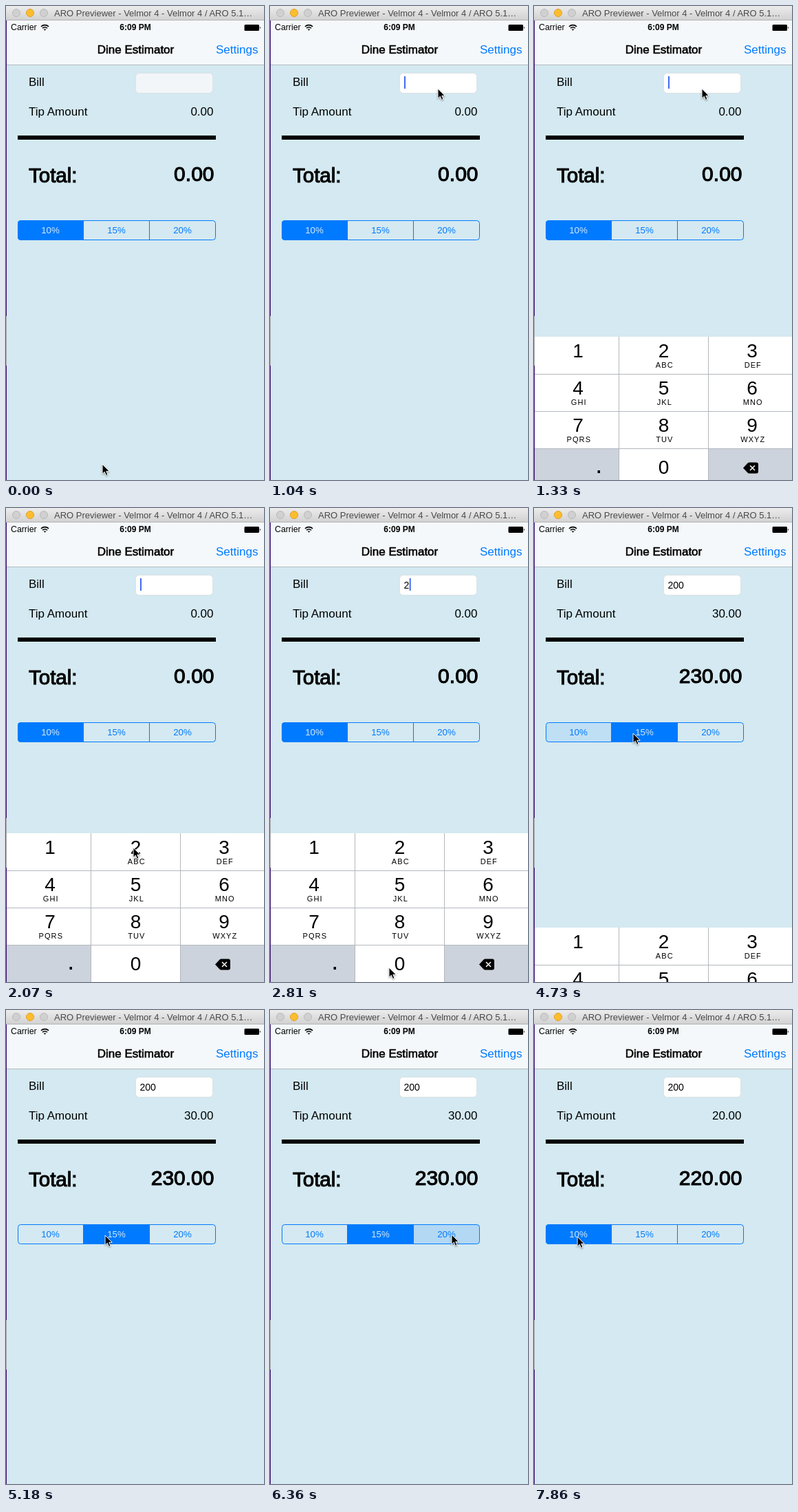
Animation of 375x688 px, one loop 8000 ms. Source, as an HTML page:

```html
<!DOCTYPE html>
<html lang="en">
<head>
<meta charset="utf-8">
<title>Dine Estimator</title>
<style>
html, body { margin: 0; width: 100%; height: 100%; overflow: hidden; background: #d4e9f1 }
svg { display: block; font: 17px "Liberation Sans", Arial, sans-serif }
.mid { text-anchor: middle }
.end { text-anchor: end }
.medium { stroke: #000; stroke-width: .6 }
.total { font-size: 30px; stroke: #000; stroke-width: 1.1 }
.blue { fill: #007aff }
.seg { font-size: 13.3px }
.digit { font-size: 28px }
.abc { font-size: 11px; letter-spacing: 1.1px }
#cursor { filter: drop-shadow(0 1px 1px #0006) }
</style>
</head>
<body>
<svg id="stage" width="375" height="688" viewBox="0 0 375 688">
  <defs>
    <linearGradient id="bar" x2="0" y2="1">
      <stop stop-color="#ececec"/><stop offset="1" stop-color="#d2d2d2"/>
    </linearGradient>
    <clipPath id="round"><rect x="17" y="311" width="288" height="29" rx="4.5"/></clipPath>
  </defs>
  <rect width="375" height="688" fill="#d4e9f1"/>

  <!-- navigation and status bars -->
  <path d="M0 21h375v64H0z" fill="#f4f8fa"/>
  <path d="M0 85.5h375" stroke="#b2bcc2"/>
  <text x="7" y="35" font-size="12.3">Carrier</text>
  <g fill="none" stroke="#000" stroke-width="1.6">
    <path d="M51 29.8a8 8 0 0 1 11 0M53 32.3a5 5 0 0 1 7 0"/>
    <path d="M54.6 33.6h3.8l-1.9 2.2z" fill="#000" stroke="none"/>
  </g>
  <text class="mid" x="188" y="35" font-size="12" font-weight="bold">6:09 PM</text>
  <rect x="346.5" y="27" width="21.5" height="9" rx="1.5"/>
  <path d="M369 30q2 1.5 0 3z"/>
  <text class="mid medium" x="188.5" y="69">Dine Estimator</text>
  <text class="blue" x="305" y="69">Settings</text>

  <!-- form -->
  <text x="33" y="116">Bill</text>
  <rect id="field" x="188.5" y="97.5" width="112" height="29" rx="5" stroke="#dbe2e5"/>
  <text id="bill" x="194.5" y="117" font-size="14"></text>
  <rect id="caret" y="102" width="2" height="18" fill="#426bf2"/>
  <text x="33" y="159">Tip Amount</text>
  <text id="tip" class="end" x="301.5" y="159"></text>
  <rect x="17" y="188" width="288" height="6"/>
  <text class="total" x="33" y="256" style="font-size:29.5px">Total:</text>
  <text id="total" class="end total" x="302.5" y="254"></text>

  <g id="segments" clip-path="url(#round)"></g>
  <rect x="17.5" y="311.5" width="287" height="28" rx="4" fill="none" stroke="#007aff"/>
  <path d="M112.5 311v29M208.5 311v29" stroke="#007aff"/>

  <g id="pad"></g>

  <!-- window frame -->
  <path d="M0 0h1v688H0z" fill="#35086b"/>
  <path d="M0 450h1v72H0z" fill="#a5a5a8"/>
  <rect width="375" height="20" fill="url(#bar)"/>
  <path d="M0 20.5h375" stroke="#b4b4b4"/>
  <g fill="#d0d0d0" stroke="#b9b9b9">
    <circle cx="15" cy="10" r="5.5"/>
    <circle cx="35" cy="10" r="5.5" fill="#fdbd2e" stroke="#dfa023"/>
    <circle cx="55" cy="10" r="5.5"/>
  </g>
  <text x="70" y="15" font-size="13" fill="#484848">ARO Previewer - Velmor 4 - Velmor 4 / ARO 5.1…</text>

  <path id="cursor" d="M0 0V14.3l3.3-3.1 2.3 5.2 2.4-1-2.2-5.1h4.5z" stroke="#fff"/>
</svg>
<script>
const $ = id => document.getElementById(id);
const LOOP = 8000, TICKS = 54;
const BLUE = '#007aff', PALE = '#d4e9f1', GREY = '#cdd3dc';

function add(parent, tag, attrs, text = '') {
  const el = document.createElementNS('http://www.w3.org/2000/svg', tag);
  for (const k in attrs) el.setAttribute(k, attrs[k]);
  el.textContent = text;
  parent.append(el);
  return el;
}

const segments = ['10%', '15%', '20%'].map((name, i) => ({
  box: add($('segments'), 'rect', { x: 17 + 96 * i, y: 311, width: 96, height: 29 }),
  label: add($('segments'), 'text', { class: 'mid seg', x: 64.5 + 96 * i, y: 330 }, name)
}));

// keypad, drawn with its top at zero
const keys = {};
const letters = ['', 'ABC', 'DEF', 'GHI', 'JKL', 'MNO', 'PQRS', 'TUV', 'WXYZ'];
const lefts = [1, 124, 254, 375], centers = [64, 188.5, 317];
['1', '2', '3', '4', '5', '6', '7', '8', '9', '.', '0', 'del'].forEach((key, i) => {
  const col = i % 3, top = (i - col) / 3 * 54, pad = $('pad');
  keys[key] = add(pad, 'rect', {
    x: lefts[col], y: top, width: lefts[col + 1] - lefts[col], height: 54,
    fill: key == '.' || key == 'del' ? GREY : '#fff'
  });
  if (i < 9 || key == '0')
    add(pad, 'text', { class: 'mid digit', x: centers[col], y: top + (i < 9 ? 30 : 37) }, key);
  if (letters[i])
    add(pad, 'text', { class: 'mid abc', x: centers[col] + 1.3, y: top + 45 }, letters[i]);
});
add($('pad'), 'path', { d: 'M1 54.5H375M1 108.5H375M1 162.5H375M123.5 0V216M253.5 0V216', stroke: '#b4b8bd' });
add($('pad'), 'rect', { x: 92.5, y: 194, width: 3.5, height: 4 });
add($('pad'), 'path', { d: 'M304 190.5l6.5-7q1-1 2.5-1h10q3 0 3 3v10q0 3-3 3h-10q-1.5 0-2.5-1z' });
add($('pad'), 'path', { d: 'M314 187l7 7m0-7l-7 7', stroke: '#fff', 'stroke-width': 1.5 });

// pointer path: tick, x, y
const path = [
  [0, 140, 665], [1, 152, 600], [2, 215, 290], [3, 277, 56], [4, 262, 84], [5, 244, 120],
  [10, 244, 120], [12, 212, 340], [14, 185, 493], [16, 185, 493], [18, 174, 645],
  [19, 173, 667], [24, 173, 667], [25, 191, 589], [27, 170, 420], [29, 144, 327],
  [37, 144, 327], [38, 185, 335], [39, 226, 332], [40, 226, 332], [42, 264, 326],
  [47, 264, 326], [48, 150, 329], [49, 63, 329], [54, 63, 329]
];

function pointer(n) {
  const i = path.findIndex(p => p[0] > n);
  const [a, ax, ay] = path[i - 1], [b, bx, by] = path[i];
  const f = (n - a) / (b - a);
  return [ax + (bx - ax) * f, ay + (by - ay) * f];
}

const within = (n, a, b) => n >= a && n < b;
const slide = d => 1 - Math.max(0, 1 - Math.max(0, d) / 2.46) ** 1.93;

function draw(n) {
  const text = n < 16 ? '' : n < 21 ? '2' : n < 23 ? '20' : '200';
  $('bill').textContent = text;
  $('field').setAttribute('fill', n < 7 ? '#f2f6f9' : '#fff');
  $('caret').setAttribute('x', 195 + 7.7 * text.length);
  $('caret').style.display = within(n, 7, 28) && !within(n, 11, 14) ? '' : 'none';

  const chosen = n < 32 ? 0 : n < 44 ? 1 : n < 53 ? 2 : 0;
  const tip = n < 32 ? 0 : 200 * (.1 + .05 * chosen);
  $('tip').textContent = tip.toFixed(2);
  $('total').textContent = (tip && 200 + tip).toFixed(2);

  // touched segment, or the one fading after deselection
  const tinted = { 31: 1, 32: 0, 43: 2, 44: 1, 52: 0 }[n];
  segments.forEach(({ box, label }, i) => {
    box.setAttribute('fill', i == chosen ? BLUE : i == tinted ? (n == 32 ? '#bfdff4' : '#b2d8f4') : PALE);
    label.setAttribute('fill', i == chosen ? PALE : BLUE);
  });

  const up = slide(n - 7) - slide(n - 31);
  $('pad').setAttribute('transform', `translate(0 ${Math.floor(688 - 216 * up)})`);
  keys[2].setAttribute('fill', n == 15 ? GREY : '#fff');
  keys[0].setAttribute('fill', n == 20 || n == 22 ? GREY : '#fff');
  $('cursor').setAttribute('transform', `translate(${pointer(n)})`);
}

// the screen refreshes in even ticks
function frame() {
  const t = performance.now() % LOOP;
  draw(Math.min(TICKS - 1, Math.floor((t + 20) * TICKS / LOOP)));
  requestAnimationFrame(frame);
}
frame();
</script>
</body>
</html>
```
